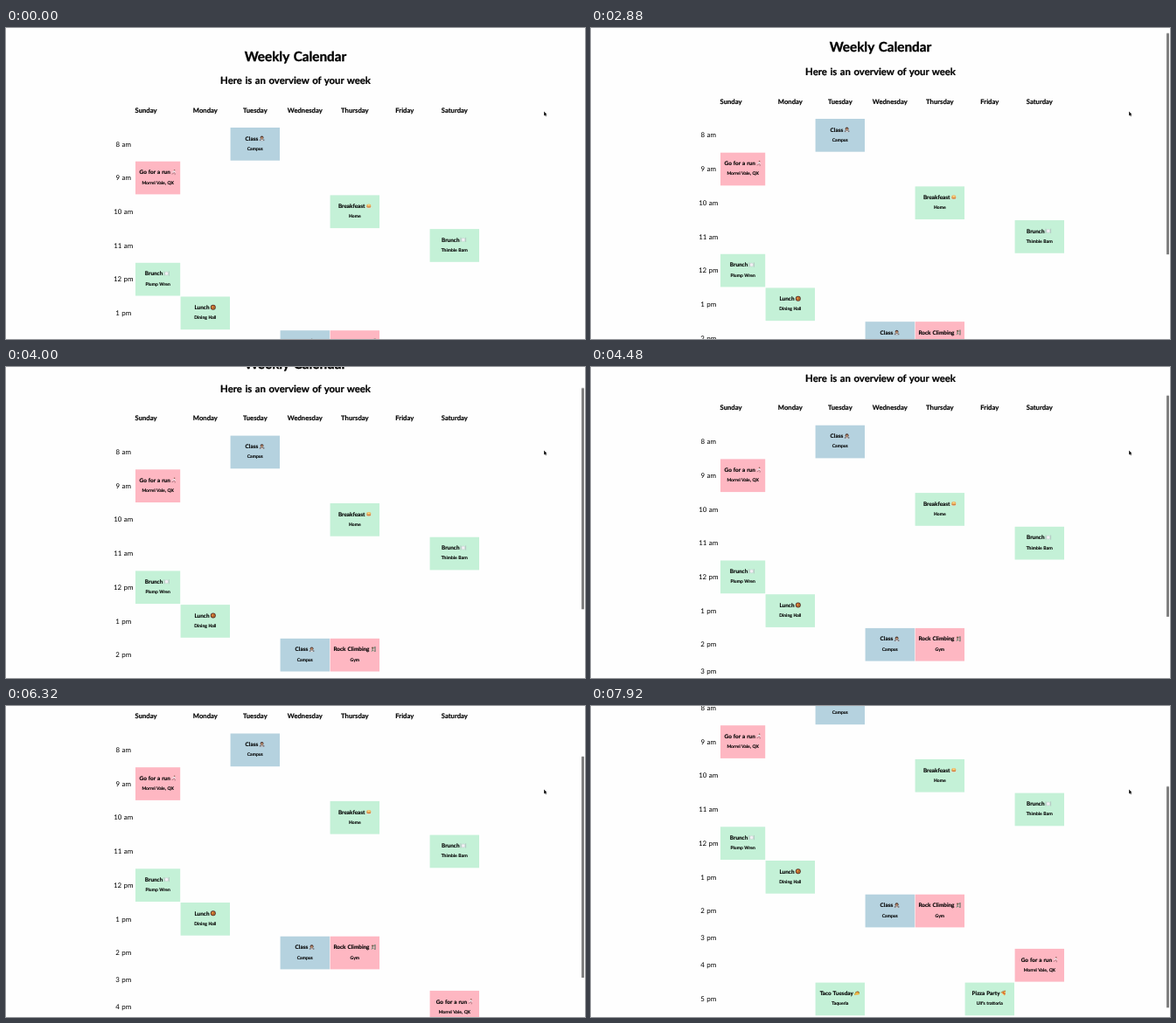
These frames come from a looping animation (662 px wide and 356 px high, 8000 ms). An HTML page:

```html
<!DOCTYPE html>
<html lang="en">
<head>
<meta charset="utf-8">
<title>Weekly Calendar</title>
<style>
  @property --scroll { syntax: "<number>"; inherits: true; initial-value: 0; }
  html, body { margin: 0; width: 100%; height: 100%; overflow: hidden; background: #fefefe; }
  svg { display: block; width: 662px; height: 356px; animation: scroll 8s infinite; }
  text {
    font-family: Lato, "Open Sans", sans-serif; font-weight: 700; fill: #000;
    stroke: #000; stroke-width: .022em;
    text-anchor: middle; word-spacing: .07em; text-rendering: geometricPrecision;
  }
  .title { font-size: 15.3px; }
  .subtitle { font-size: 11.35px; }
  .day { font-size: 7.65px; }
  .hour { font-size: 7.9px; font-weight: 400; stroke: none; }
  .event { font-size: 6.4px; text-anchor: end; }
  .place { font-size: 5.05px; }
  #page { transform: translateY(calc(var(--scroll) * -1px)); }
  #thumb { transform: translateY(calc(var(--scroll) * .715px)); animation: reveal 8s infinite; }

  /* One percent is 80 ms, the length of one scroll step. */
  @keyframes scroll {
    0% { --scroll: 0; animation-timing-function: step-end; }
    24% { --scroll: 1.8; animation-timing-function: steps(5); }
    29% { --scroll: 7.2; animation-timing-function: step-end; }
    31% { --scroll: 7.8; animation-timing-function: step-end; }
    32% { --scroll: 8.4; animation-timing-function: step-end; }
    35% { --scroll: 8.4; animation-timing-function: steps(8); }
    43% { --scroll: 21.5; animation-timing-function: steps(13); }
    56% { --scroll: 47.3; animation-timing-function: steps(11); }
    67% { --scroll: 71; animation-timing-function: step-end; }
    73% { --scroll: 71; animation-timing-function: steps(6); }
    79% { --scroll: 82.5; animation-timing-function: steps(9); }
    88% { --scroll: 102.2; animation-timing-function: steps(11); }
    99%, 100% { --scroll: 130.5; animation-timing-function: step-end; }
  }
  @keyframes reveal {
    0% { opacity: 0; animation-timing-function: step-end; }
    24%, 100% { opacity: 1; }
  }
</style>
</head>
<body>
<svg viewBox="0 0 662 356" xmlns="http://www.w3.org/2000/svg">
  <defs>
    <g id="teacher">
      <path d="M-2.8 2.8V1.2H2.8V2.8Z" fill="#77747a"/>
      <circle cy="-.8" r="1.9" fill="#4a332c"/>
      <circle cy="-.3" r="1.2" fill="#c89a7c"/>
      <path d="M-1.5 2.8Q0 .2 1.5 2.8Z" fill="#e8e4e2"/>
    </g>
    <g id="runner" fill="none" stroke-width=".8" stroke-linecap="round">
      <circle cx=".5" cy="-2.3" r=".8" fill="#8d5f50"/>
      <path d="M.2-1.2 0 .6M-1.6-.2 .2-1 1.7 0" stroke="#e9eef2"/>
      <path d="M0 .6 1.3 1.6 1 2.8M0 .6-1 1.8-2.3 2" stroke="#a5727b"/>
    </g>
    <g id="pancakes">
      <ellipse cy="1.3" rx="3" ry="1.4" fill="#e9e6dc"/>
      <ellipse cy=".6" rx="2.6" ry="1.5" fill="#c98443"/>
      <ellipse cy="-.7" rx="2.6" ry="1.6" fill="#eeb060"/>
      <rect x="-.8" y="-1.6" width="1.6" height="1.2" fill="#fbe58c"/>
    </g>
    <g id="plate">
      <circle r="2" fill="#f3f1f5" stroke="#c6c7cf" stroke-width=".5"/>
      <path d="M-2.8-2.6V2.6M2.8-2.6V2.6" stroke="#a9abb5" stroke-width=".6"/>
    </g>
    <g id="stew">
      <circle r="3" fill="#53352b"/>
      <circle r="2.2" fill="#c8662d"/>
      <circle cx="-.7" cy="-.5" r=".7" fill="#efb64d"/>
      <circle cx=".8" cy=".6" r=".6" fill="#6f8c3b"/>
    </g>
    <g id="climber">
      <path d="M.8-3H3V3H1L1.6.4Z" fill="#8d8780"/>
      <circle cx="-.8" cy="-1.7" r=".9" fill="#6b4432"/>
      <path d="M-.9-.7-.8 1-1.8 2.7M-.8 1 .7 1.8M-.9-.5 1-1.6" fill="none" stroke="#5c8068" stroke-width=".9"/>
    </g>
    <g id="taco">
      <path d="M-3 1.6Q-2-2.8 1.4-2.4 3-1.8 3 .3Z" fill="#6d9a3c"/>
      <path d="M-2-1 .8-2.2 2.6-.8Z" fill="#c9472f"/>
      <path d="M-3 2Q-2.2-1.6.6-1.5 3-1.2 2.8 1.4Z" fill="#eeb445"/>
    </g>
    <g id="pizza">
      <path d="M-2.8-.9 2.3-2.8 1.3 2.8Z" fill="#efb044"/>
      <path d="M-2.8-.9Q-.6-3 2.3-2.8" fill="none" stroke="#b56a32" stroke-width=".9"/>
      <circle cx="-.2" cy="-.7" r=".8" fill="#c93a2d"/>
      <circle cx="1.2" cy=".6" r=".7" fill="#c93a2d"/>
    </g>
  </defs>
  <g id="page">
    <text class="title" x="331" y="37.5">Weekly Calendar</text>
    <text class="subtitle" x="331" y="64.1">Here is an overview of your week</text>
  </g>
  <rect id="thumb" x="658" y="-1.2" width="3" height="253.3" rx=".5" fill="#7f7f7f"/>
  <path d="M615.2 95.5V100.4L616.3 99.5 617 101.2 617.8 100.8 617.1 99.2H618.5Z" fill="#000" stroke="#fff" stroke-width=".4" paint-order="stroke"/>
</svg>
<script>
  const page = document.getElementById("page");
  const DAYS = ["Sunday", "Monday", "Tuesday", "Wednesday", "Thursday", "Friday", "Saturday"];
  const [SUN, MON, TUE, WED, THU, FRI, SAT] = DAYS.keys();
  const BLUE = "#b5d2df", PINK = "#feb7c2", GREEN = "#c4f1d7";
  const COLUMN = 57, ROW = 38.7, TITLE_GAP = 4.3;

  // Day, hour, colour, title, place, icon, icon offset from the cell centre
  const EVENTS = [
    [TUE, 8, BLUE, "Class", "Campus", "teacher", 7.8],
    [SUN, 9, PINK, "Go for a run", "Morrel Vale, QX", "runner", 18.5],
    [THU, 10, GREEN, "Breakfeast", "Home", "pancakes", 16],
    [SAT, 11, GREEN, "Brunch", "Thimble Barn", "plate", 10],
    [SUN, 12, GREEN, "Brunch", "Plump Wren", "plate", 10],
    [MON, 13, GREEN, "Lunch", "Dining Hall", "stew", 9],
    [WED, 14, BLUE, "Class", "Campus", "teacher", 7.8],
    [THU, 14, PINK, "Rock Climbing", "Gym", "climber", 21],
    [SAT, 16, PINK, "Go for a run", "Morrel Vale, QX", "runner", 18.5],
    [TUE, 17, GREEN, "Taco Tuesday", "Taqueria", "taco", 19.3],
    [FRI, 17, GREEN, "Pizza Party", "Ulf's trattoria", "pizza", 16]
  ];

  function add(tag, attributes, content = "") {
    const node = document.createElementNS("http://www.w3.org/2000/svg", tag);
    for (const name in attributes) node.setAttribute(name, attributes[name]);
    node.textContent = content;
    page.append(node);
  }
  const label = (kind, x, y, content) => add("text", { class: kind, x, y }, content);

  // The empty 3 pm row is shorter than the others.
  const rowTop = hour => 114 + (hour - 8) * ROW - (hour > 15 ? 15.2 : 0);
  const left = day => day === SUN ? 148 : 142.6 + day * COLUMN;

  DAYS.forEach((name, day) => label("day", day === SUN ? 160 : 170.8 + day * COLUMN, 96.7, name));

  for (let hour = 8; hour <= 17; hour++) {
    const middle = hour === 15 ? 396 : rowTop(hour) + 19;
    label("hour", 134.2, middle + 2.5, `${hour > 12 ? hour - 12 : hour} ${hour < 12 ? "am" : "pm"}`);
  }

  for (const [day, hour, fill, title, place, icon, offset] of EVENTS) {
    const x = left(day), y = rowTop(hour), width = day === SUN ? 51.2 : 56.4;
    const center = x + width / 2, iconX = center + offset;
    add("rect", { x, y, width, height: 37.7, fill });
    label("event", iconX - TITLE_GAP, y + 14.6, title);
    label("place", center, y + 25.8, place);
    add("use", { href: "#" + icon, x: iconX, y: y + 12.3 });
  }
</script>
</body>
</html>
```
